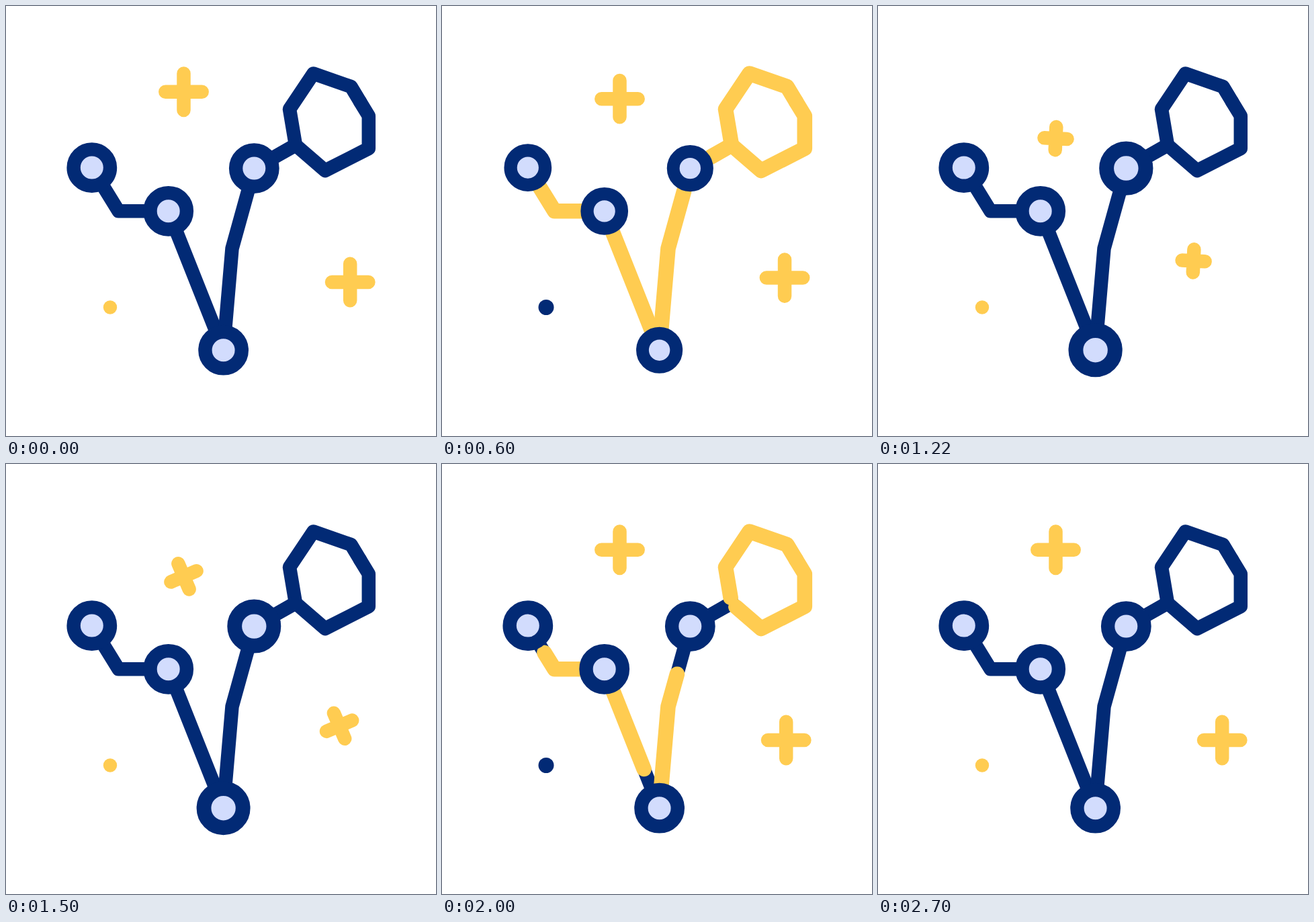
These frames come from a looping animation (640x640 px, 3.4 s). An HTML page:

```html
<!DOCTYPE html>
<html lang="en">
<head>
<meta charset="utf-8">
<title>Constellation</title>
<style>
  html, body { margin: 0; width: 100%; height: 100%; overflow: hidden; background: #fff; }
  svg { display: block; width: 100vw; height: 100vh; }
  path { fill: none; stroke-linecap: round; stroke-linejoin: round; }
  .line { stroke: #022a75; stroke-width: 20.5; }
  .glow { stroke: #ffcc51; stroke-width: 22.6; }
  .plus { stroke: #ffcc51; stroke-width: 20.5; }
  .ring { fill: #d2dcfd; stroke: #022a75; stroke-width: 20.4; }
</style>
</head>
<body>
<svg id="stage" viewBox="0 0 640 640"></svg>
<script>
const LOOP = 3400, END = 2700, STEP = 540;
const stage = document.getElementById('stage');

function add(tag, attrs) {
  const el = document.createElementNS('http://www.w3.org/2000/svg', tag);
  for (const k in attrs) el.setAttribute(k, attrs[k]);
  return stage.appendChild(el);
}

const ease = u => { u = Math.min(1, Math.max(0, u)); return u * u * (3 - 2 * u); };
const ramp = (t, a, b) => ease((t - a) / (b - a));

// Piecewise eased value through [time, value] keys
function track(keys, t) {
  if (t <= keys[0][0]) return keys[0][1];
  for (let i = 1; i < keys.length; i++) {
    const [t0, v0] = keys[i - 1], [t1, v1] = keys[i];
    if (t < t1) return v0 + (v1 - v0) * ramp(t, t0, t1);
  }
  return keys[keys.length - 1][1];
}

const dotBase = add('circle', { cx: 155, cy: 448.5, r: 10.2, fill: '#ffcc51' });
const dotTop = add('circle', { cx: 155, cy: 448.5, r: 11.5, fill: '#022a75' });

// Light travels along each path from its first point
const routes = [
  'M142 264L167.5 305.3H214.2',
  'M313.5 486.6L251.5 330.4',
  'M362.2 268.3L336.5 361L325.9 485',
  'M393.3 228.4L431 207L422 153.5L457.5 100.5L513.5 120L526.9 142.3',
  'M393.3 228.4L431 207L475 245L539.8 212V163.5L526.9 142.3'
];
routes.forEach(d => add('path', { d, class: 'line' }));
const glows = routes.map(d => add('path', { d, class: 'glow', pathLength: 1 }));

const nodes = [[127.8, 240.6, 0], [241.7, 305.3, 0], [369.3, 241.6, 420], [323.6, 512.2, 420]]
  .map(([x, y, delay]) => ({ x, y, delay, el: add('circle', { r: 27.2, class: 'ring' }) }));
const pulse = [[0, 1], [360, 0.85], [960, 1.12], [1230, 1]];

// Each plus drifts along a quadratic curve: home, bend, far offset
const pluses = [
  { x: 264.5, y: 127.8, bend: [0, 35], far: [0, 69.3] },
  { x: 512.2, y: 411, bend: [-4.9, -22.6], far: [-42.6, -31.6] }
].map(p => ({ ...p, el: add('path', { class: 'plus' }) }));
const drift = [[470, 0], [1010, 1], [1260, 1], [1790, 0]];
const spin = [[700, 0], [1262, 1], [1840, 0]];

function draw(t) {
  // The light runs forward, then retraces its way
  const m = Math.min(t, END - t);
  const head = ramp(m, 0, STEP), tail = ramp(m, STEP, 2 * STEP);
  const lit = head - tail > 0.0005;
  for (const g of glows) {
    g.style.visibility = lit ? 'visible' : 'hidden';
    g.setAttribute('stroke-dasharray', `${head - tail} 3`);
    g.setAttribute('stroke-dashoffset', -tail);
  }
  const dark = m >= STEP && m < 2 * STEP;
  dotTop.style.visibility = dark ? 'visible' : 'hidden';
  dotBase.style.visibility = dark ? 'hidden' : 'visible';

  for (const n of nodes) {
    const s = track(pulse, t - n.delay);
    n.el.setAttribute('transform', `translate(${n.x} ${n.y}) scale(${s})`);
  }

  const p = track(drift, t), r = track(spin, t);
  const arm = 27.2 - 10.3 * r;
  for (const { el, x, y, bend, far } of pluses) {
    const at = i => 2 * p * (1 - p) * bend[i] + p * p * far[i];
    el.setAttribute('d', `M${-arm} 0H${arm}M0 ${-arm}V${arm}`);
    el.setAttribute('transform', `translate(${x + at(0)} ${y + at(1)}) rotate(${-180 * r})`);
  }
}

const start = performance.now();
function tick() {
  draw(Math.min(END, (performance.now() - start) % LOOP));
  requestAnimationFrame(tick);
}
tick();
</script>
</body>
</html>
```
